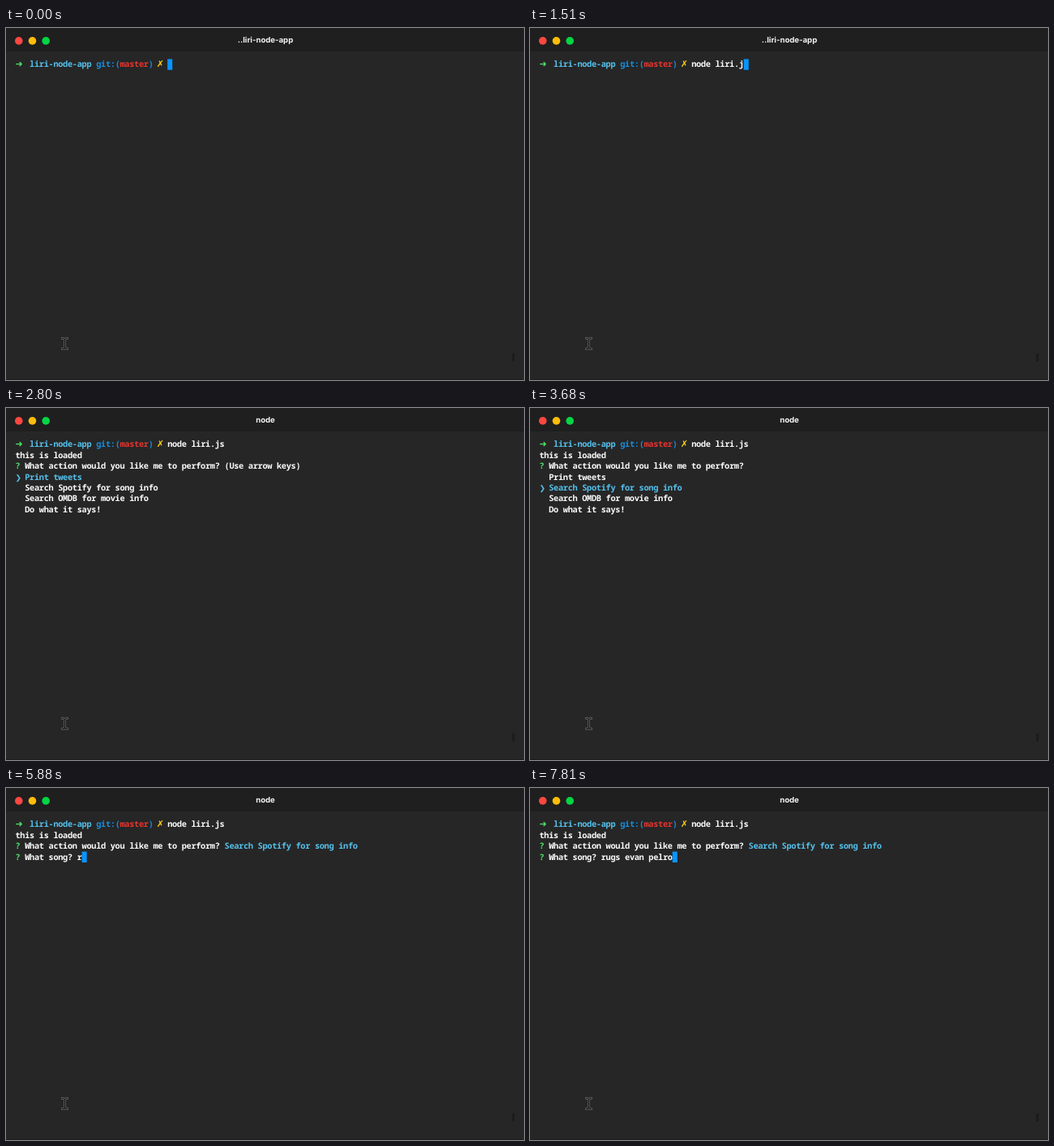
Write an HTML page that moves like this. It is 639 by 435 pixels and loops after 8000 ms.

```html
<!DOCTYPE html>
<html lang="en">
<head>
<meta charset="utf-8">
<title>Terminal session</title>
<style>
  html, body { margin: 0; width: 100%; height: 100%; overflow: hidden; background: #262626; }
  svg { display: block; width: 100%; height: 100%; }
  text { white-space: pre; text-rendering: geometricPrecision; }
  #screen { font: 600 10.3px "Noto Sans Mono", "DejaVu Sans", monospace; letter-spacing: -0.316px; }
  #screen .sign { font: bold 11px "DejaVu Sans", sans-serif; }
  #screen .pointer { font: 9px "DejaVu Sans", sans-serif; }
  #title { font: 700 9.6px Inter, "Open Sans", sans-serif; fill: #f4f4f4; text-anchor: middle; }
</style>
</head>
<body>
<svg viewBox="0 0 639 435" preserveAspectRatio="none">
  <defs>
    <path id="beam" d="M69.5 383.5q3 0 3 2v9q0 2 -3 2M75.5 383.5q-3 0 -3 2M75.5 396.5q-3 0 -3 -2"/>
  </defs>
  <rect width="639" height="435" fill="#262626"/>
  <rect width="639" height="29" fill="#1f1f1f"/>
  <path d="M0 434.5H639" stroke="#1b1b1b"/>
  <circle cx="15.8" cy="15.9" r="4.8" fill="#fc4840"/>
  <circle cx="32.5" cy="15.9" r="4.8" fill="#febd0a"/>
  <circle cx="49.2" cy="15.9" r="4.8" fill="#05d644"/>
  <text id="title" x="320" y="18.4"></text>
  <g id="screen"></g>
  <g fill="none" stroke-linecap="square">
    <use href="#beam" stroke="#747474" stroke-width="2.4"/>
    <use href="#beam" stroke="#161616" stroke-width="1.2"/>
  </g>
  <rect x="624.5" y="402" width="3" height="10" rx="1" fill="#1b1b1b"/>
</svg>
<script>
const LOOP = 8000;
const LEFT = 11.5, TOP = 38.4, CELL = 5.864, LINE = 13.4;
const WHITE = "#fafafa", GREEN = "#4ee26a", CYAN = "#54c1ec", BLUE = "#158fdf",
      RED = "#e5352f", YELLOW = "#ffd20a", CURSOR = "#0795ff";

const COMMAND = "node liri.js";
const SONG = "rugs evan pelro";
const QUESTION = "What action would you like me to perform?";
const CHOICES = ["Print tweets", "Search Spotify for song info",
                 "Search OMDB for movie info", "Do what it says!"];

// Each pair: time in ms, characters typed by then
const COMMAND_KEYS = [[440, 1], [590, 2], [740, 4], [890, 5], [1040, 6],
                      [1200, 8], [1360, 9], [1510, 11], [1660, 12]];
const SONG_KEYS = [[5880, 1], [6030, 2], [6170, 3], [6320, 4], [6470, 5],
                   [6760, 7], [6910, 8], [7060, 9], [7200, 10], [7350, 11],
                   [7500, 12], [7650, 13], [7810, 15]];
const ENTER = 1800, LOADED = 1950, MENU = 2800, MOVE = 3680, CHOSEN = 4700;

const title = document.getElementById("title");
const screen = document.getElementById("screen");

const typed = (text, keys, t) =>
  text.slice(0, keys.reduce((n, [at, count]) => t >= at ? count : n, 0));

const put = (row, col, text, fill, kind = "") =>
  `<text class="${kind}" x="${LEFT + col * CELL}" y="${TOP + row * LINE + 10}" fill="${fill}">${text}</text>`;

const cursor = (row, col) =>
  `<rect x="${LEFT + col * CELL}" y="${TOP + row * LINE}" width="${CELL + 0.2}" height="${LINE}" fill="${CURSOR}"/>`;

const ask = (row, text) => put(row, 0, "?", GREEN) + put(row, 2, text, WHITE);

const prompt = command =>
  put(0, 0, "➜", GREEN, "sign") + put(0, 3, "liri-node-app", CYAN) +
  put(0, 17, "git:(", BLUE) + put(0, 22, "master", RED) + put(0, 28, ")", BLUE) +
  put(0, 29.7, "✗", YELLOW, "sign") + put(0, 32, command, WHITE);

const menu = picked => CHOICES.map((text, i) => i === picked
  ? put(3 + i, 0, "❯", CYAN, "pointer") + put(3 + i, 2, text, CYAN)
  : put(3 + i, 2, text, WHITE)).join("");

function draw(t) {
  const command = typed(COMMAND, COMMAND_KEYS, t);
  let out = prompt(command);
  if (t < ENTER) out += cursor(0, 32 + command.length);
  else if (t < LOADED) out += cursor(1, 0);
  else out += put(1, 0, "this is loaded", WHITE);

  if (t >= LOADED && t < MENU) out += cursor(2, 0);
  if (t >= MENU) out += ask(2, QUESTION);
  if (t >= MENU && t < MOVE) out += put(2, 44, "(Use arrow keys)", WHITE) + menu(0);
  else if (t >= MOVE && t < CHOSEN) out += menu(1);
  else if (t >= CHOSEN) {
    const song = typed(SONG, SONG_KEYS, t);
    out += put(2, 44, CHOICES[1], CYAN) + ask(3, "What song?") +
           put(3, 13, song, WHITE) + cursor(3, 13 + song.length);
  }
  return out;
}

let shown = "";
function tick() {
  const t = performance.now() % LOOP;
  const next = draw(t);
  if (next !== shown) {
    screen.innerHTML = shown = next;
    title.textContent = t < ENTER ? "..liri-node-app" : "node";
  }
  requestAnimationFrame(tick);
}
tick();
</script>
</body>
</html>
```
